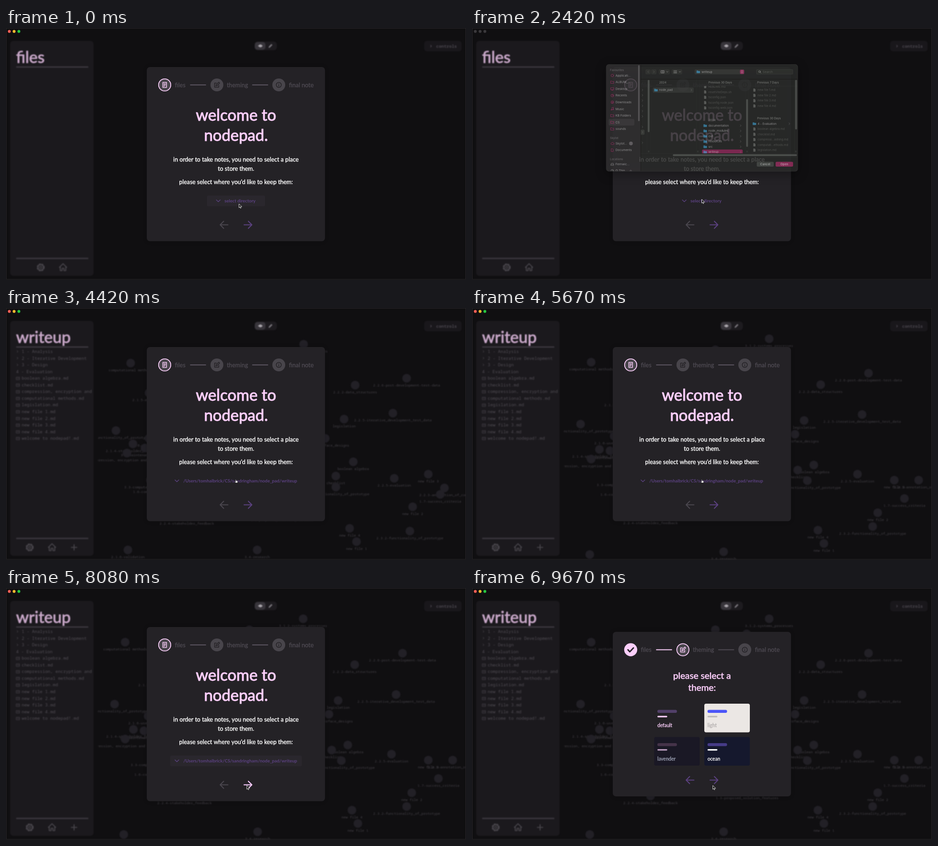
An HTML page with a canvas that plays this animation: 1000 px wide and 549 px high, repeating every 9710 ms.

```html
<!DOCTYPE html>
<html lang="en">
<head>
<meta charset="utf-8">
<title>nodepad setup</title>
<style>
html, body { margin: 0; height: 100%; overflow: hidden; background: #100f11; }
canvas { display: block; }
</style>
</head>
<body>
<canvas id="stage" width="1000" height="549"></canvas>
<script>
const LOOP = 9710;
const ROUND = 'Lato, sans-serif', MONO = '"Noto Sans Mono", monospace', UI = 'Inter, sans-serif';
const PINK = '#fccffb', PURPLE = '#5b4180', PANEL = '#242226', GREY = '#48454b', DIM = '#4d4951';
const ROSE = '#d8307f', FOLDER = '#45b5ee', LISTING = '#514d54';

const stage = document.getElementById('stage').getContext('2d');
const backdrop = Object.assign(document.createElement('canvas'), { width: 1000, height: 549 });
const behind = backdrop.getContext('2d');
let g = stage;

const ramp = (t, from, to) => Math.min(1, Math.max(0, (t - from) / (to - from)));
const smooth = u => u * u * (3 - 2 * u);

function text(str, x, y, size, color, { font = ROUND, align = 'left', weight = 400 } = {}) {
  g.font = `${weight} ${size}px ${font}`;
  g.textAlign = align;
  g.fillStyle = g.strokeStyle = color;
  g.fillText(str, x, y + size * 0.35);
  if (font === ROUND && weight === 400) {
    g.lineWidth = size * 0.03;
    g.lineJoin = 'round';
    g.strokeText(str, x, y + size * 0.35);
  }
}
const centred = (str, x, y, size, color) => text(str, x, y, size, color, { align: 'center' });
const ui = (str, x, y, color = '#e6e5e6', size = 6.25, weight = 400, align = 'left') =>
  text(str, x, y, size, color, { font: UI, weight, align });

function box(x, y, w, h, r, color) {
  g.fillStyle = color;
  g.beginPath();
  g.roundRect(x, y, w, h, r);
  g.fill();
}
function disc(x, y, r, color) {
  g.fillStyle = color;
  g.beginPath();
  g.arc(x, y, r, 0, 7);
  g.fill();
}
function icon(shape, x, y, color, width = 1, fill) {
  const path = new Path2D(shape);
  g.save();
  g.translate(x, y);
  g.lineCap = g.lineJoin = 'round';
  g.lineWidth = width;
  g.strokeStyle = color;
  if (fill) { g.fillStyle = fill; g.fill(path); }
  g.stroke(path);
  g.restore();
}
function faded(alpha, draw) {
  if (alpha <= 0) return;
  g.save();
  g.globalAlpha *= alpha;
  draw();
  g.restore();
}
const circlePath = r => `M${r} 0a${r} ${r} 0 1 1-${2 * r} 0a${r} ${r} 0 1 1 ${2 * r} 0z`;

const ICON = {
  doc: 'M-4-5.5h8v11h-8zM-1.7-2.4h3.4M-1.7 0h3.4M-1.7 2.4h1.8',
  edit: 'M-1-4h-4v9h9v-4M-2 2l.5-2.5L4-6l2 2L.5 1.5z',
  info: circlePath(5.5) + 'M0-.3v3M0-2.8v.3',
  check: 'M-6 0l4 4.5 8-8.5',
  next: 'M-8.5 0h17M.8-7.7L8.5 0 .8 7.7',
  back: 'M8.5 0h-17M-.8-7.7L-8.5 0-.8 7.7',
  down: 'M-4.2-2.1L0 2.1l4.2-4.2',
  right: 'M-1-2L1 0-1 2',
  left: 'M1-2L-1 0 1 2',
  home: 'M-8 0L0-8 8 0M-6-1v8h4v-5h4v5h4v-8',
  plus: 'M-6 0H6M0-6V6',
  eye: 'M-4.5 0Q0-5.5 4.5 0 0 5.5-4.5 0z',
  pencil: 'M-3.5 3.5l.6-2.4L2-3.7 3.7-2-1.1 2.9z',
  folder: 'M-3.3-2.4h2.4l.8.9h3.4v4h-6.6z',
  page: 'M-2-3h2.7L2-1.6V3h-4z',
  screen: 'M-3.2-2.5h6.4v4.3h-6.4zM-1.5 3h3',
  note: 'M-1 2V-2.8l3.5-.6V1.3M-1 2a1 .8 0 1 1-2 0a1 .8 0 1 1 2 0M2.5 1.3a1 .8 0 1 1-2 0a1 .8 0 1 1 2 0',
  cloud: 'M-2 2.3a1.7 1.7 0 0 1 0-3.2 2.4 2.4 0 0 1 4.4 0 1.6 1.6 0 0 1 0 3.2z',
  drive: 'M-3 .2l1-2.5h4l1 2.5v2.2h-6zh6',
  clock: circlePath(3) + 'M0-1.6V0h1.4',
  pointer: 'M0 0v8l1.9-1.7 1.3 2.9 1.3-.6-1.3-2.8h2.6z',
  hand: 'M-1.2-3.7q.8-.7 1.4.2l.2 2.1 2.4.7q.9.3.7 1.4L3 3.5h-3.9L-3.1.7q-.1-1 .9-.8l1 .8z'
};

// Each row: final x, final y, offset while still settling, label
const NODES = [
  [646, 67, 1, 12, '3.1.2-systems_processes'], [862, 142, 9, 11, '2.2.6-post-development-test-data'],
  [758, 167, 1, 1, '2.2.2-data_structures'], [848, 232, -7, -3, '2.2.5-iterative_development_test_data'],
  [722, 245, 13, -3, 'legislation'], [702, 275, -8, 9, '3.3.2-interface_designs'],
  [743, 342, 12, -7, 'boolean algebra'], [708, 353, 9, 13, 'checklist'],
  [729, 376, -12, 14, '2.1.2-functionality_of_prototype'], [838, 362, 6, 9, '2.2.5-evaluation'],
  [918, 375, 0, -13, 'new file 3'], [971, 375, -18, 17, '2.2.3-annotation_of_code'],
  [940, 415, 4, -9, '1.7-success_criteria'], [882, 446, 2, -13, 'new file 2'],
  [752, 484, -5, -4, 'new file 4'], [765, 513, -3, -4, 'new file 1'],
  [871, 476, 7, 10, '2.3.2-functionality_of_prototype'], [259, 118, 12, 2, 'computational methods'],
  [324, 196, -13, -11, '2.1.5-evaluation'], [236, 253, 3, 14, '2.1.2-functionality_of_prototype'],
  [309, 279, 2, 5, '2.1.6-user_feedback'], [277, 308, -1, -12, '2.1.4-stakeholder_feedback'],
  [300, 311, 2, -6, '3.5-maintenance_of_code'], [259, 329, 4, -13, 'compression, encryption and hashing'],
  [328, 370, -14, 5, '3.3-computational_methods'], [329, 391, -3, -6, '1.6-computational_need'],
  [388, 453, 5, 1, '2.2.4-stakeholder_feedback'], [256, 537, 9, -10, '2.1.6-validation'],
  [547, 531, -1, -4, '3.4-research'], [598, 442, 2, 4, '1.3-proposed_solution_features'],
  [529, 91, 3, 9, 'new file'], [597, 100, 2, 8, 'design']
];
const FILES = ['boolean algebra', 'checklist', 'compression, encryption and', 'computational methods', 'legislation',
  'new file 1', 'new file 2', 'new file 3', 'new file 4', 'welcome to nodepad!'];

function drawGraph(t) {
  const drift = t < 4960 ? ((4960 - t) / 540) ** 2 : 0;
  g.save();
  g.beginPath();
  g.rect(200, 20, 800, 529);
  g.clip();
  for (const [x, y, dx, dy, name] of NODES) {
    const nx = x + dx * drift, ny = y + dy * drift;
    disc(nx, ny, 9.5, '#222026');
    text(name, nx, ny + 15.5, 7.6, '#454248', { font: MONO, align: 'center' });
  }
  g.restore();
}

function gear(x, y) {
  g.save();
  g.setLineDash([3, 3.2]);
  icon(circlePath(7.4), x, y, GREY, 2.4);
  g.restore();
  icon(circlePath(5.8), x, y, GREY, 2);
  icon(circlePath(2.4), x, y, GREY, 1.6);
}

function drawSidebar(loaded) {
  box(9, 28, 181.5, 512, 7, '#1b191d');
  text(loaded ? 'writeup' : 'files', 22, 64, 35, '#c9a8c9');
  box(22, 83.5, 157, 3, 1, '#3b373e');
  box(22, 500.5, 157, 3, 1, '#3b373e');
  if (loaded) {
    const row = (str, i, x = 34) => text(str, x, 94.7 + i * 14.55, 9.44, LISTING, { font: MONO });
    ['1 - Analysis', '2 - Iterative Development', '3 - Design'].forEach((name, i) => {
      icon(ICON.right, 25, 94.7 + i * 14.55, LISTING);
      row(name, i);
    });
    row('4 - Evaluation', 3, 22);
    FILES.forEach((name, i) => {
      const full = name.endsWith('and') ? name : name + '.md';
      icon('M-3.5-2.5h7v5.5h-7zM-2 0h4', 26, 95 + (i + 4) * 14.55, '#454148');
      row(full, i + 4);
    });
  }
  const left = loaded ? 51.5 : 75.5;
  gear(left, 521.5);
  icon(ICON.home, left + 48.5, 521.5, GREY, 2);
  if (loaded) icon(ICON.plus, 148, 521.5, GREY, 2);
}

function drawBackdrop(t, loaded) {
  g = behind;
  g.clearRect(0, 0, 1000, 549);
  if (loaded) drawGraph(t);
  drawSidebar(loaded);
  box(540, 29.5, 49, 19, 7, '#1d1b1f');
  box(541, 30.5, 23, 17, 6, '#38353b');
  icon(ICON.eye, 553, 39, '#aaa6ac', 1, '#aaa6ac');
  icon(ICON.pencil, 575, 39, '#77737a', 1, '#77737a');
  box(909, 28, 81.5, 23, 6, '#19171b');
  icon(ICON.right, 924, 39.5, '#4a464e', 1.4);
  text('controls', 935, 39.5, 9.44, '#4a464e', { font: MONO, weight: 700 });
  g = stage;
  g.save();
  g.filter = 'blur(1.2px)';
  g.drawImage(backdrop, 0, 0);
  g.restore();
}

function drawStepper(y, done) {
  const step = (x, shape, active) => {
    disc(x, y, 14, GREY);
    if (active) icon(circlePath(13.2), x, y, PINK, 1.8);
    icon(shape, x, y, active ? PINK : PANEL, 1.5);
  };
  if (done) {
    disc(345, y, 14.2, PINK);
    icon(ICON.check, 345, y, PANEL, 3);
  } else step(345, ICON.doc, true);
  step(458.5, ICON.edit, done);
  step(593, ICON.info, false);
  box(400, y - 1, 35, 2, 1, done ? PINK : '#5b5460');
  box(535, y - 1, 35, 2, 1, done ? '#4f4a53' : '#5b5460');
  text('files', 367, y, 13.1, DIM);
  text('theming', 480, y, 12.9, DIM);
  text('final note', 615, y, 13.1, DIM);
}

function drawNext(y, glow) {
  icon(ICON.next, 526, y, PURPLE, 2.1);
  faded(glow, () => icon(ICON.next, 526, y, PINK, 2.1));
}

function drawWelcome(t, loaded) {
  drawStepper(124, false);
  centred('welcome to', 500, 190, 34.2, PINK);
  centred('nodepad.', 500, 234, 34.2, PINK);
  centred('in order to take notes, you need to select a place', 500, 286.5, 12.85, '#fff');
  centred('to store them.', 500, 306.5, 12.85, '#fff');
  centred("please select where you'd like to keep them:", 500, 335.5, 12.85, '#fff');

  const left = loaded ? 357 : 437;
  const plate = 1 - ramp(t, 40, 240) + ramp(t, 7640, 7840);
  faded(plate, () => box(left, 365, 1000 - 2 * left, 23.5, 3, '#2a272d'));
  icon(ICON.down, left + 24.5 - (loaded ? 10 : 0), 376.5, PURPLE, 1.4);
  text(loaded ? '/Users/tomhalbrick/CS/sandringham/node_pad/writeup' : 'select directory',
    loaded ? 385.5 : 475, 376.8, 9.8, PURPLE, { weight: 700 });

  icon(ICON.back, 474, 428.7, '#4b474f', 2.1);
  drawNext(428.7, ramp(t, 7800, 8000));
}

function drawThemes(t) {
  drawStepper(134.5, true);
  centred('please select a', 500, 191, 19.8, PINK);
  centred('theme:', 500, 217, 19.8, PINK);
  const card = (name, x, y, fill, bar, line, ink) => {
    box(x, y, 99, 62.5, 4, fill);
    box(x + 7, y + 13.5, 42.5, 6.5, 3, bar);
    box(x + 7, y + 26.5, 21.5, 3.2, 1.6, line);
    text(name, x + 7, y + 47.5, 10.5, ink);
  };
  card('default', 396, 252, PANEL, '#524069', PINK, PINK);
  card('light', 505, 252, '#ebe7e4', '#4b55f8', '#bcb9b8', '#b3afae');
  card('lavender', 396, 324.5, '#1a1825', '#453349', '#b99bbd', '#a0a5b8');
  card('ocean', 505, 324.5, '#15182d', '#463b87', '#fff', '#fff');
  icon(ICON.back, 474, 418.5, PURPLE, 2.1);
  drawNext(418.5, 1 - ramp(t, 8250, 8450));
}

function drawPlaces() {
  const heading = (str, y) => ui(str, 300, y, '#858186', 6, 600);
  const place = (name, shape, y, color = ROSE) => {
    icon(shape, 305, y, color, 0.9);
    ui(name, 312, y, '#e6e5e6', 6.6);
  };
  heading('Favourites', 92);
  box(297, 198, 56, 14.5, 3, '#434143');
  [['Applicati…', circlePath(2.8)], ['ALBUM_…', ICON.folder], ['Desktop', ICON.screen],
    ['Recents', ICON.clock], ['Downloads', circlePath(3) + 'M0-1.5v3M-1 .5l1 1 1-1'], ['Music', ICON.note],
    ['KB Folders', ICON.folder], ['CS', ICON.folder], ['sounds', ICON.folder]]
    .forEach(([name, shape], i) => place(name, shape, 103.5 + i * 14.55));
  heading('Skylot', 240);
  place('Skylot…', ICON.cloud, 251.5);
  disc(345.5, 251.5, 4, '#8b888b');
  place('Documents', ICON.page, 266);
  heading('Locations', 285.5);
  place('Fernwic…', ICON.drive, 297, '#a5a2a5');
  place('Q Thin', ICON.clock, 311, '#a5a2a5');
  icon('M-2 0L0-2 2 0zM-2 1.6h4', 345, 311, '#8b888b', 0.8);
  box(361, 81, 3.5, 122, 2, '#747274');
}

function drawToolbar() {
  const button = (x, w, fill = '#393b38') => box(x, 90, w, 11, 2.5, fill);
  button(377, 11.5);
  button(389.5, 11.5);
  icon(ICON.left, 383, 95.5, '#777976', 0.9);
  icon(ICON.right, 395.5, 95.5, '#777976', 0.9);
  button(406, 24);
  icon('M-3.5-2.5h7v5h-7zM-1.2-2.5v5M1.2-2.5v5', 414.5, 95.5, '#ccc', 0.9);
  button(434, 23);
  for (let i = 0; i < 9; i++) box(438.5 + i % 3 * 2.5, 92.5 + (i / 3 | 0) * 2.4, 1.7, 1.5, 0, '#ccc');
  for (const x of [424.5, 452]) icon('M-1.6-.8L0 .8 1.6-.8', x, 95.5, '#ccc', 0.9);
  button(484, 108, '#424440');
  icon(ICON.folder, 492, 95.5, FOLDER, 0.6, FOLDER);
  ui('writeup', 499, 95.5, '#eee', 6.6);
  box(582.5, 90.7, 9, 9.6, 2.5, ROSE);
  icon('M-1.5-1L0-2.5 1.5-1M-1.5 1L0 2.5 1.5 1', 587, 95.5, '#fff', 0.8);
  button(618, 80, '#484a47');
  box(618.7, 90.7, 78.6, 9.6, 2, '#252724');
  icon(circlePath(2) + 'M1.5 1.5l1.8 1.8', 625, 95, '#ddd', 0.8);
  ui('Search', 632, 95.5, '#777976', 6.6);
}

function drawColumns() {
  const grey = '#747673', rule = '#353734';
  const file = (name, x, y) => {
    icon(ICON.page, x, y, '#858784', 0.5, '#858784');
    ui(name, x + 7, y, grey);
  };
  const folder = (name, x, y, end) => {
    icon(ICON.folder, x, y, FOLDER, 0.6, FOLDER);
    ui(name, x + 7, y);
    icon(ICON.right, end, y, '#999b98', 0.7);
  };
  const title = (str, x, y) => ui(str, x, y, '#a9aba8', 6.1, 600);
  g.save();
  g.beginPath();
  g.rect(367, 126, 341, 147);
  g.clip();
  box(366, 221.5, 9, 11, 2, '#4a4c49');
  for (const i of [0, 1, 2, 3, 4, 5, 7, 8, 10]) icon(ICON.right, 370.5, 135 + i * 11.5, '#8b8d8a', 0.7);
  box(393, 129.5, 89, 11.5, 2.5, '#424441');
  folder('node_pad', 400, 135.2, 477);
  ['README.md', 'resetViteDeps.sh', 'tsconfig.json', 'tsconfig.node.json', 'tsconfig.web.json']
    .forEach((name, i) => file(name, 507, 127.8 + i * 11.55));
  title('2024', 514, 200.5);
  box(500, 264.8, 88.5, 12, 2.5, '#c92877');
  ['documentation', 'node_modules', 'out', 'resources', 'src', 'writeup']
    .forEach((name, i) => folder(name, 507, 212.7 + i * 11.5, 584));
  for (let i = 0; i < 4; i++) file(`new file ${i + 1}.md`, 614, 135.2 + i * 11.55);
  title('Previous 30 Days', 620, 196.5);
  folder('4 - Evaluation', 614, 208.5, 690);
  ['boolean algebra.md', 'checklist.md', 'compressi…ashing.md', 'computati…ethods.md', 'legislation.md']
    .forEach((name, i) => file(name, 614, 220 + i * 11.5));
  g.restore();
  title('2024', 407, 119);
  title('Previous 30 Days', 514, 119);
  title('Previous 7 Days', 620, 119);
  box(367, 111, 341, 0.8, 0, '#0c0d0b');
  box(387, 126, 321, 0.7, 0, rule);
  for (const [x, y, h] of [[382, 113, 114], [596, 155, 104], [702.5, 113, 108]]) {
    box(x - 1.5, 112, 0.7, 161, 0, rule);
    box(x + 5.5, 112, 0.7, 161, 0, rule);
    box(x, y, 4, h, 2, '#6c6e6b');
  }
  box(488, 112, 0.7, 161, 0, rule);
  box(494.5, 112, 0.7, 161, 0, rule);
  for (const x of [384, 491, 598, 704]) icon('M-.8-1.5v3M.8-1.5v3', x, 269, '#777976', 0.5);
  box(367, 273, 341, 0.7, 0, rule);
  box(436.5, 275, 270, 4, 2, '#6c6e6b');
  box(367, 281, 341, 0.7, 0, rule);
}

function drawDialog() {
  g.save();
  g.shadowColor = '#000a';
  g.shadowBlur = 22;
  g.shadowOffsetY = 6;
  box(291.5, 79, 417, 233.5, 6, '#505150');
  g.restore();
  g.save();
  g.beginPath();
  g.roundRect(292.3, 79.8, 415.4, 231.9, 5.5);
  g.clip();
  box(292, 79, 75, 234, 0, '#292729');
  box(367, 79, 342, 234, 0, '#1c1e1b');
  box(366.5, 79, 0.8, 234, 0, '#0c0d0b');
  drawPlaces();
  drawToolbar();
  drawColumns();
  box(619, 291.5, 37, 10.5, 2.5, '#5b5d5a');
  box(660, 291.5, 38, 10.5, 2.5, ROSE);
  ui('Cancel', 637.5, 296.7, '#fff', 6.6, 500, 'center');
  ui('Open', 679, 296.7, '#fff', 6.6, 500, 'center');
  g.restore();
}

function drawCursor(t) {
  const settle = smooth(ramp(t, 0, 240)), leave = smooth(ramp(t, 7460, 7960));
  const x = 506.5 - 7 * settle + 24 * leave;
  const y = 383.5 - 10 * settle + 57 * leave;
  const pointing = (t > 60 && t < 2400) || (t > 4150 && t < 7640);
  if (pointing) icon(ICON.hand, x + 0.8, y + 4, '#000', 0.7, '#fff');
  else icon(ICON.pointer, x, y, '#e8e8e8', 0.9, '#111');
}

function frame() {
  const t = performance.now() % LOOP;
  const loaded = t >= 4200, welcoming = t < 8250;
  const dialog = ramp(t, 2400, 2440) * (1 - ramp(t, 4080, 4160));
  g = stage;
  g.fillStyle = '#100f11';
  g.fillRect(0, 0, 1000, 549);
  drawBackdrop(t, loaded);
  g.strokeStyle = '#29272a';
  g.lineWidth = 1;
  g.strokeRect(0.5, 0.5, 999, 547);
  ['#fe5f57', '#febc2e', '#28c840'].forEach((color, i) =>
    disc(7.2 + i * 10.4, 7.4, 3.1, dialog > 0.5 ? '#3b393c' : color));

  g.save();
  g.shadowColor = '#0003';
  g.shadowBlur = 10;
  if (welcoming) box(306, 85, 387.5, 379.5, 7, PANEL);
  else box(306, 95.5, 387.5, 358.5, 7, PANEL);
  g.restore();
  if (welcoming) drawWelcome(t, loaded);
  else drawThemes(t);
  faded(dialog, drawDialog);
  drawCursor(t);
  requestAnimationFrame(frame);
}
frame();
</script>
</body>
</html>
```
